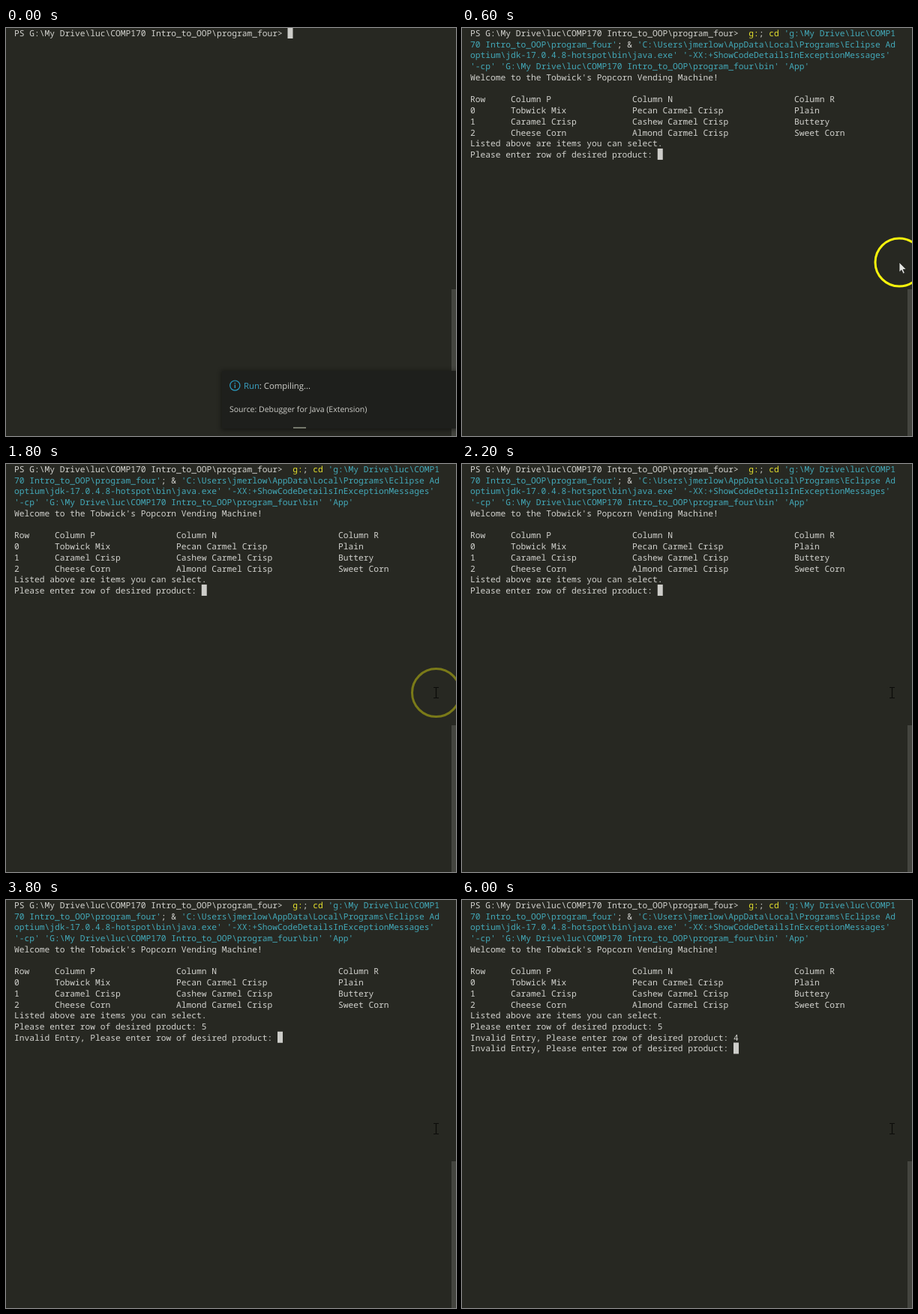
Write an HTML page that moves like this. It is 600 by 545 pixels and loops after 8 s.

```html
<!DOCTYPE html>
<html lang="en">
<head>
<meta charset="utf-8">
<title>Vending machine terminal</title>
<style>
  html, body { margin: 0; width: 100%; height: 100%; overflow: hidden; background: #272822; }
  svg { display: block; width: 600px; height: 545px; }
  text { white-space: pre; text-rendering: geometricPrecision; }
  #term text { font: 11.25px "Noto Sans Mono", "DejaVu Sans Mono", monospace; fill: #d2d2ce; }
  #note text { font-family: "Open Sans", "Noto Sans", sans-serif; fill: #cfcfca; }
  #term .cmd { fill: #e6e22e; }
  #term .str { fill: #43a9b9; }
</style>
</head>
<body>
<svg viewBox="0 0 600 545">
  <defs>
    <filter id="shadow" x="-10%" y="-30%" width="120%" height="160%">
      <feGaussianBlur stdDeviation="3"/>
    </filter>
  </defs>
  <rect width="600" height="545" fill="#272822"/>
  <rect x="594" y="349" width="6" height="196" fill="#44453f"/>
  <g id="term"></g>
  <rect id="caret" width="7" height="15" fill="#cdcdc9"/>
  <g id="note">
    <rect x="287" y="458" width="320" height="79" fill="#000" opacity=".45" filter="url(#shadow)"/>
    <rect x="288" y="458" width="312" height="77" fill="#1e1f1c"/>
    <circle cx="305.3" cy="477.6" r="6.6" fill="none" stroke="#2b9fc4" stroke-width="1.2"/>
    <path d="M305.3 476.6v4.4M305.3 473.8v1.4" stroke="#2b9fc4" stroke-width="1.3"/>
    <text x="317" y="482" font-size="11.3"><tspan style="fill:#3ba3c4">Run</tspan>: Compiling...</text>
    <text x="298" y="513" font-size="10.5">Source: Debugger for Java (Extension)</text>
    <rect id="bar" y="533" width="17" height="2" fill="#75786c"/>
  </g>
  <g id="mouse">
    <circle id="ring" r="32" fill="none" stroke="#f8f40c" stroke-width="3"/>
    <path id="arrow" d="M0 0V13.2L3 10.4L5.2 15.2L7.4 14.2L5.2 9.6H9.4Z" fill="#e4e4e2" stroke="#1b1c18" stroke-width=".8"/>
    <path id="beam" d="M-3.5 -7H-.8L0 -6.4L.8 -7H3.5M0 -6.4V6.4M-3.5 7H-.8L0 6.4L.8 7H3.5" fill="none" stroke="#0b0b09" stroke-width="1.2"/>
  </g>
</svg>
<script>
const LOOP = 8000, STEP = 200;
const LEFT = 11, CELL = 6.75, LINE = 14.73;
const $ = id => document.getElementById(id);
const NS = "http://www.w3.org/2000/svg";

const PROMPT = "PS G:\\My Drive\\luc\\COMP170 Intro_to_OOP\\program_four> ";
const ASK = "Please enter row of desired product: ";
const RETRY = "Invalid Entry, " + ASK;
const cols = (a, b, c, d) => a.padEnd(8) + b.padEnd(24) + c.padEnd(32) + d;
const cmd = s => [s, "cmd"];
const str = s => [s, "str"];

// Each row is a list of plain strings or [text, class] pairs.
const output = [
  [PROMPT + " ", cmd("g:"), "; ", cmd("cd"), " ", str("'g:\\My Drive\\luc\\COMP1")],
  [str("70 Intro_to_OOP\\program_four'"), "; & ", str("'C:\\Users\\jmerlow\\AppData\\Local\\Programs\\Eclipse Ad")],
  [str("optium\\jdk-17.0.4.8-hotspot\\bin\\java.exe' '-XX:+ShowCodeDetailsInExceptionMessages'")],
  [str("'-cp' 'G:\\My Drive\\luc\\COMP170 Intro_to_OOP\\program_four\\bin' 'App'")],
  ["Welcome to the Tobwick's Popcorn Vending Machine!"],
  [],
  [cols("Row", "Column P", "Column N", "Column R")],
  [cols("0", "Tobwick Mix", "Pecan Carmel Crisp", "Plain")],
  [cols("1", "Caramel Crisp", "Cashew Carmel Crisp", "Buttery")],
  [cols("2", "Cheese Corn", "Almond Carmel Crisp", "Sweet Corn")],
  ["Listed above are items you can select."]
];

function screenAt(t) {
  if (t < 600) return [[PROMPT]];
  const rows = [...output, [ASK + (t >= 3400 ? "5" : "")]];
  if (t >= 3800) rows.push([RETRY + (t >= 5800 ? "4" : "")]);
  if (t >= 6000) rows.push([RETRY]);
  return rows;
}

function drawRow(row, i) {
  const line = document.createElementNS(NS, "text");
  line.setAttribute("x", LEFT);
  line.setAttribute("y", 11 + i * LINE);
  for (const part of row) {
    const [text, kind] = Array.isArray(part) ? part : [part, ""];
    const span = document.createElementNS(NS, "tspan");
    span.setAttribute("class", kind);
    span.textContent = text;
    line.append(span);
  }
  return line;
}

// Pointer path: time, x, y
const path = [[400, 585, 315.5], [600, 583, 313], [800, 579, 309.5], [1000, 571.5, 304.5], [1200, 573.5, 305.5]];

function pointerAt(t) {
  const i = path.findIndex(p => p[0] >= t);
  if (i < 0) return path[path.length - 1].slice(1);
  if (i === 0) return path[0].slice(1);
  const [a, b] = [path[i - 1], path[i]];
  const k = (t - a[0]) / (b[0] - a[0]);
  return [1, 2].map(n => a[n] + (b[n] - a[n]) * k);
}

const show = (id, on) => $(id).setAttribute("visibility", on ? "inherit" : "hidden");

let drawn = -1;
function render(time) {
  const t = Math.floor((time % LOOP) / STEP) * STEP;
  if (t === drawn) return;
  drawn = t;

  const rows = screenAt(t);
  $("term").replaceChildren(...rows.map(drawRow));
  const last = rows.length - 1;
  $("caret").setAttribute("x", LEFT + rows[last][0].length * CELL);
  $("caret").setAttribute("y", last * LINE - 1);
  show("caret", t !== 400);

  show("note", t < 400);
  $("bar").setAttribute("x", 383 + t * 0.15);

  const [x, y] = pointerAt(t);
  $("mouse").setAttribute("transform", `translate(${x} ${y})`);
  show("mouse", t >= 400);
  show("arrow", t >= 400 && t < 800);
  show("beam", t >= 800);
  $("ring").setAttribute("opacity", Math.max(0, Math.min(1, (2200 - t) / 1000)));
}

const start = performance.now();
function frame() {
  render(performance.now() - start);
  requestAnimationFrame(frame);
}
frame();
</script>
</body>
</html>
```
